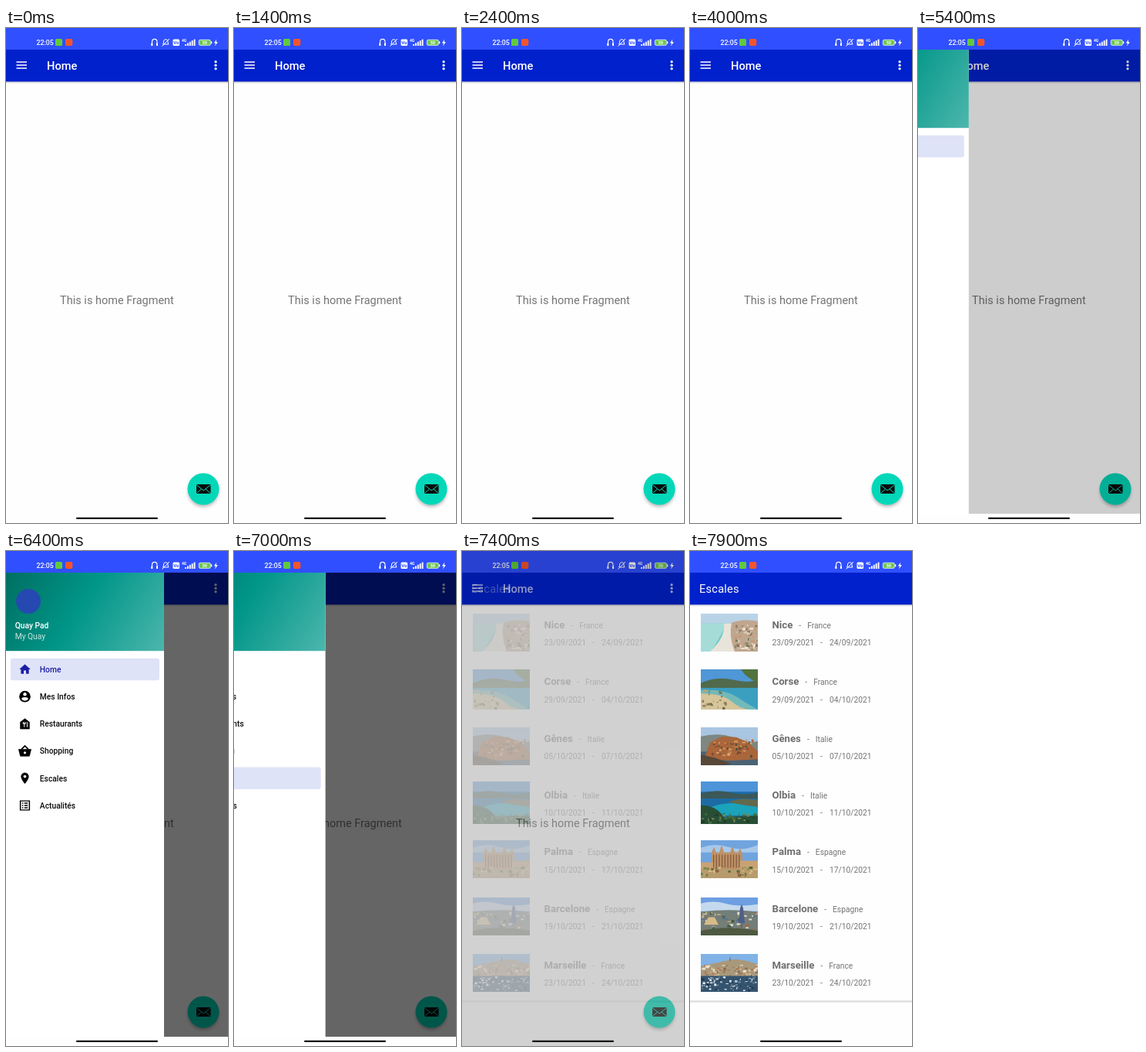
These frames come from a looping animation (288x640 px, 8 s). An HTML page:

```html
<!DOCTYPE html>
<html lang="fr">
<head>
<meta charset="utf-8">
<title>Drawer navigation</title>
<style>
  html, body { margin: 0; width: 100%; height: 100%; overflow: hidden; background: #fefefe; }
  svg { display: block; }
  #stage { width: 100%; height: 100%; }
  text { font-family: Roboto, "Open Sans", sans-serif; white-space: pre; }
  .title { font-size: 14.67px; font-weight: 500; fill: #fff; }
  .plain { font-weight: 400; letter-spacing: .2px; }
  .item { font-size: 10.27px; font-weight: 500; }
  .city { font-size: 13.2px; font-weight: 700; fill: #6e6e6e; }
  .small { font-size: 10.27px; font-weight: 400; fill: #757575; }
</style>
</head>
<body>
<svg id="stage" viewBox="0 0 288 640" preserveAspectRatio="none">
  <defs>
    <linearGradient id="teal" gradientUnits="userSpaceOnUse" x1="205" y1="129" x2="0" y2="0">
      <stop offset="0" stop-color="#4db6ac"/>
      <stop offset=".5" stop-color="#009688"/>
      <stop offset="1" stop-color="#00695c"/>
    </linearGradient>
    <linearGradient id="drop" x1="0" y1="0" x2="0" y2="1">
      <stop offset="0" stop-color="#000" stop-opacity=".2"/>
      <stop offset="1" stop-color="#000" stop-opacity="0"/>
    </linearGradient>
    <filter id="soft" x="-30%" y="-30%" width="160%" height="160%"><feGaussianBlur stdDeviation="2"/></filter>
  </defs>
  <g id="home"></g>
  <g id="stops"></g>
  <g id="status"></g>
  <rect id="scrim" width="288"/>
  <g id="drawer"></g>
  <rect x="91" y="632.8" width="106" height="2.2" rx="1" fill="#161616"/>
</svg>
<script>
const LOOP = 8000;
const DRAWER = 205;
const SETTLE = 550;
const OPEN_AT = 5360, PICK_AT = 6880, CLOSE_AT = 6944, SWAP_AT = 7300;
const $ = id => document.getElementById(id);

const rect = (x, y, w, h, fill, extra = '') =>
  `<rect x="${x}" y="${y}" width="${w}" height="${h}" fill="${fill}" ${extra}/>`;
const circle = (x, y, r, fill, extra = '') =>
  `<circle cx="${x}" cy="${y}" r="${r}" fill="${fill}" ${extra}/>`;
const path = (d, fill, extra = '') => `<path d="${d}" fill="${fill}" ${extra}/>`;
const line = (d, color, w) => path(d, 'none', `stroke="${color}" stroke-width="${w}"`);
const text = (x, y, s, cls, extra = '') => `<text x="${x}" y="${y}" class="${cls}" ${extra}>${s}</text>`;

function toolbar(title, x, cls) {
  return rect(0, 28, 288, 41.4, '#0021cb') + rect(0, 69.4, 288, 2.6, 'url(#drop)') + text(x, 54, title, cls);
}

// Small seeded generator for the specks in the pictures
function random(seed) {
  return () => (seed = (seed * 16807) % 2147483647) / 2147483647;
}
function specks(seed, n, x, y, w, h, colors, size = 4) {
  const rnd = random(seed * 7919);
  let out = '';
  for (let i = 0; i < n; i++) {
    out += rect((x + rnd() * w).toFixed(1), (y + rnd() * h).toFixed(1),
      (1 + rnd() * size).toFixed(1), (1 + rnd() * size * .7).toFixed(1), colors[i % colors.length]);
  }
  return out;
}

// Each scene is painted on a 74 x 50 field
const scenes = {
  nice: () => rect(0, 0, 74, 50, '#b9d3e6') + path('M0 13H40L30 50H0Z', '#72cbc9') +
    path('M0 13H34L14 50H0Z', '#a5dcd8') + path('M30 13L44 13Q38 28 46 50H12Q32 32 30 13Z', '#e9e4da') +
    path('M40 12Q56 6 74 10V50H44Q36 30 40 12Z', '#bfa78f') +
    specks(3, 60, 42, 13, 30, 34, ['#d9c5ae', '#8c765f', '#c79a78', '#6f7d62', '#eee3d4']),
  corse: () => rect(0, 0, 74, 50, '#4f97d6') + path('M0 17Q20 8 42 13T74 12V25H0Z', '#516a4c') +
    rect(0, 23, 74, 27, '#3b9fc0') + path('M0 26Q30 24 46 34T74 50H0Z', '#72b9b9') +
    path('M0 30Q28 30 40 40T64 50H0Z', '#d6c49a') + path('M52 0H74V16Q60 12 52 0Z', '#52733f') +
    specks(5, 22, 0, 25, 32, 22, ['#8d7a58', '#b8a37b', '#6c6b50']),
  genes: () => rect(0, 0, 74, 50, '#a9c5e2') + path('M0 12Q24 6 44 14T74 18V38H0Z', '#7e8781') +
    rect(0, 32, 74, 18, '#4b6273') + path('M4 42L12 20 28 12 46 13 62 20 74 32V42L40 44Z', '#a9663b') +
    specks(8, 60, 14, 16, 52, 22, ['#d39354', '#80482f', '#dfae73', '#b9653a', '#56503c']) +
    path('M0 36L18 40 40 48 30 50H0Z', '#564739'),
  olbia: () => rect(0, 0, 74, 50, '#4d94d9') + rect(0, 12, 74, 38, '#1d6ba4') +
    path('M0 14Q20 9 38 13T74 13V20H0Z', '#3c5858') + path('M14 30Q34 22 74 28V40H20Z', '#1ba3bb') +
    path('M36 24Q54 18 74 22V30Q54 28 36 24Z', '#62694d') + path('M0 28Q20 28 30 42L74 40V50H0Z', '#284f36') +
    specks(11, 36, 0, 36, 72, 12, ['#456d3b', '#1d3d2b', '#7a8650']),
  palma: () => rect(0, 0, 74, 50, '#70a4df') + path('M0 10Q18 3 36 9T74 6V16H0Z', '#a8c8ea') +
    path('M14 40V16L17 9 20 16H24L27 6 30 16H38L41 8 44 16H48L51 11 54 18V40Z', '#bd9266') +
    path('M0 29H18V44H0ZM50 27H74V44H50Z', '#c9a273') +
    Array.from({ length: 10 }, (_, i) => rect(16 + i * 3.7, 19, 1.2, 17, '#80583d')).join('') +
    rect(0, 38, 74, 12, '#b89b6c') + specks(14, 34, 0, 34, 72, 12, ['#4a6736', '#73854b', '#d9bd8a', '#8a6444']),
  barcelone: () => rect(0, 0, 74, 50, '#6d9fe2') + path('M0 8Q16 3 32 8T74 9V18H0Z', '#c5d9ee') +
    path('M0 19Q36 14 74 19V50H0Z', '#747e78') +
    specks(17, 80, 0, 19, 72, 28, ['#c9b184', '#46583b', '#e5ddcd', '#986c49', '#58748d']) +
    path('M49 34L51 14 53 9 55 14 57 34Z', '#4f5f88') + path('M4 36L10 26 18 26 23 36Z', '#d7bb89') +
    path('M0 44Q34 36 74 44V50H0Z', '#4d5940'),
  marseille: () => rect(0, 0, 74, 50, '#80b2e7') + path('M0 16Q24 11 38 8T74 14V30H0Z', '#aa987b') +
    path('M37 9L38 3 39 9Z', '#756a59') + specks(20, 58, 0, 14, 72, 14, ['#d9bd94', '#ad7955', '#ece0ca', '#806f5a']) +
    rect(0, 29, 74, 21, '#34536f') +
    specks(23, 70, 0, 29, 72, 19, ['#e8edf0', '#6f899c', '#203b54', '#b8c7d1'], 3)
};

const trips = [
  ['Nice', 'France', '23/09/2021', '24/09/2021', 81, 49],
  ['Corse', 'France', '29/09/2021', '04/10/2021', 153, 52],
  ['Gênes', 'Italie', '05/10/2021', '07/10/2021', 228, 49],
  ['Olbia', 'Italie', '10/10/2021', '11/10/2021', 298, 55],
  ['Palma', 'Espagne', '15/10/2021', '17/10/2021', 374, 49],
  ['Barcelone', 'Espagne', '19/10/2021', '21/10/2021', 448, 49],
  ['Marseille', 'France', '23/10/2021', '24/10/2021', 521, 49]
];
const sceneList = Object.values(scenes);

function tripRow([city, country, from, to, top, height], i) {
  const y = 100 + i * 73.35;
  return `<svg x="14" y="${top}" width="74" height="${height}" viewBox="0 0 74 50" preserveAspectRatio="none">${sceneList[i]()}</svg>` +
    text(106.5, y, `${city}<tspan class="small" dx="8">-</tspan><tspan class="small" dx="8">${country}</tspan>`, 'city') +
    text(106.5, y + 22.3, from, 'small') + text(169, y + 22.3, '-', 'small') + text(181, y + 22.3, to, 'small');
}

// Icons are drawn around 0,0 on a 24 unit grid
const icons = {
  home: path('M-2 8V2H2V8H7V0H10L0 -9 -10 0H-7V8Z', 'currentColor'),
  user: circle(0, 0, 10, '#000') + circle(0, -4, 3, '#fff') + path('M-6 4C-6 0 6 0 6 4 3 8.5 -3 8.5 -6 4Z', '#fff'),
  food: path('M0 -9L8 -3V9H-8V-3Z', '#000', 'stroke="#000" stroke-linejoin="round"') +
    line('M-3 -3V0M-1 -3V6M1 -3V0M-3 0H1M4 -3V6', '#fff', 1.3),
  basket: path('M-11 -3H11L8 9H-8Z', '#000', 'stroke="#000" stroke-linejoin="round"') +
    line('M-6 -3L0 -9 6 -3', '#000', 2.4) + circle(0, 3, 2.2, '#fff'),
  pin: path('M0 10S-7 2 -7 -3A7 7 0 0 1 7 -3C7 2 0 10 0 10Z', '#000') + circle(0, -3, 2.5, '#fff'),
  list: line('M-8 -8H8V8H-8Z', '#000', 2) + line('M-5 -4H-3M-1 -4H5M-5 0H-3M-1 0H5M-5 4H-3M-1 4H5', '#000', 2)
};
const menu = [
  ['Home', 'home'], ['Mes Infos', 'user'], ['Restaurants', 'food'],
  ['Shopping', 'basket'], ['Escales', 'pin'], ['Actualités', 'list']
];
const rowY = i => 153 + i * 35.2;

$('home').innerHTML = rect(0, 69, 288, 571, '#fefefe') + toolbar('Home', 53, 'title') +
  line('M13.5 44H27M13.5 48H27M13.5 52H27', '#fff', 1.6) +
  [43.7, 48.2, 52.7].map(y => circle(272, y, 1.6, '#fff')).join('') +
  text(144, 357, 'This is home Fragment', '', 'font-size="14.5" fill="#757575" text-anchor="middle"') +
  circle(256, 599, 20, '#000', 'opacity=".28" filter="url(#soft)"') + circle(256, 596, 20.5, '#02d8b9') +
  rect(247, 590, 18.5, 12, '#0a0a0a', 'rx=".8"') +
  line('M247 590.5L256.2 598 265.5 590.5M247.5 601.5L253.5 596M265 601.5L259 596', '#02d8b9', 1);

$('stops').innerHTML = rect(0, 69, 288, 571, '#fefefe') + toolbar('Escales', 12, 'title plain') +
  trips.map(tripRow).join('') + rect(0, 581.5, 288, 3, 'url(#drop)');

$('drawer').innerHTML = rect(0, 28, DRAWER, 600, '#fff') + rect(0, 28, DRAWER, 101.2, 'url(#teal)') +
  circle(29, 65, 16, '#2549b0') +
  text(11.7, 100, 'Quay Pad', 'item', 'fill="#fff"') +
  text(11.7, 114, 'My Quay', 'small', 'style="fill:#c5e7e1"') +
  rect(6, 0, 193, 28.5, '#dfe3f8', 'id="mark" rx="2.9"') +
  menu.map(([label, icon], i) =>
    `<g id="row${i}"><g transform="translate(24.5 ${rowY(i)}) scale(.733)">${icons[icon]}</g>` +
    text(43.8, rowY(i) + 3.7, label, 'item', 'fill="currentColor"') + '</g>').join('');

$('status').innerHTML = rect(0, 0, 288, 28, '#304ffe') +
  text(39.5, 22, '22:05', '', 'font-size="8.8" font-weight="500" fill="#fff"') +
  rect(64, 14, 9, 9, '#62c93c', 'rx="1.5"') + rect(77, 14, 9.3, 9, '#f4552d', 'rx="2"') +
  line('M189.5 22V18A3.2 3.6 0 0 1 196 18V22', '#fff', 1.1) +
  rect(188.3, 19.5, 2, 3.5, '#fff') + rect(195, 19.5, 2, 3.5, '#fff') +
  line('M203.5 21H211L210 19V17A2.8 2.8 0 0 0 204.5 17V19ZM202.5 23.5L212 14', '#fff', 1) +
  rect(216.5, 14.5, 8.6, 8.5, '#fff', 'rx="1.5"') +
  text(217.3, 21.3, 'Vo', '', 'font-size="6" font-weight="700" fill="#304ffe"') +
  text(228, 18, '4G', '', 'font-size="5" font-weight="700" fill="#fff"') +
  [0, 1, 2, 3, 4].map(i => rect(232 + i * 2.9, 21 - i * 1.6, 1.9, 2 + i * 1.6, '#fff')).join('') +
  rect(250.3, 15.3, 15, 7, '#6fc74f', 'rx="1.5" stroke="#e8f5e6" stroke-width=".9"') + rect(266, 17.3, 1.2, 3, '#fff') +
  text(257.8, 21, '59', '', 'font-size="5.5" font-weight="700" fill="#fff" text-anchor="middle"') +
  path('M273.2 14.5L269.8 19.5H272L271 23.5 274.8 18H272.5Z', '#fff');

const clamp = v => Math.min(1, Math.max(0, v));
const settle = (t, start) => 1 - (1 - clamp((t - start) / SETTLE)) ** 5;

function draw(t) {
  const open = settle(t, OPEN_AT) - settle(t, CLOSE_AT);
  $('drawer').setAttribute('transform', `translate(${(open - 1) * DRAWER} 0)`);

  const picked = t < PICK_AT ? 0 : 4;
  $('mark').setAttribute('y', rowY(picked) - 14.3);
  menu.forEach((_, i) => { $('row' + i).style.color = i === picked ? '#1b1fa3' : '#0c0c0c'; });

  // The shade leaves the system bars free until the screens swap
  const swapping = t >= SWAP_AT;
  const scrim = $('scrim');
  scrim.setAttribute('y', swapping ? 0 : 28);
  scrim.setAttribute('height', swapping ? 640 : 600);
  scrim.setAttribute('opacity', .6 * settle(t, OPEN_AT) * (1 - clamp((t - 7000) / 570)));
  $('stops').setAttribute('opacity', clamp((t - SWAP_AT) / 333));
}

function tick(now) {
  draw(now % LOOP);
  requestAnimationFrame(tick);
}
draw(0);
requestAnimationFrame(tick);
</script>
</body>
</html>
```
